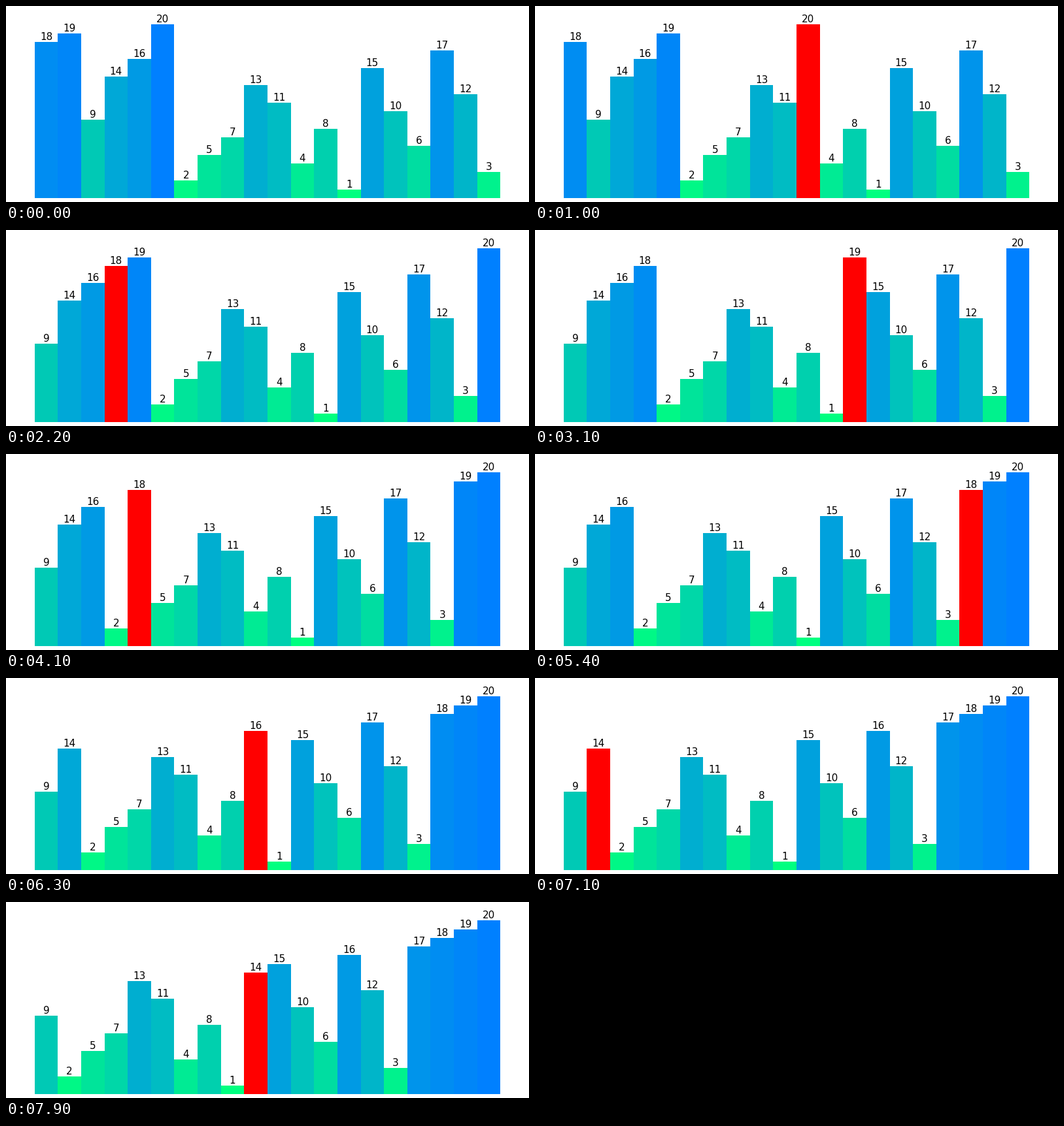
Write a matplotlib script that moves like this. It is 800x300 px and loops after 8 s.

```python
import matplotlib.pyplot as plt
from matplotlib.animation import FuncAnimation

START = [18, 19, 9, 14, 16, 20, 2, 5, 7, 13, 11, 4, 8, 1, 15, 10, 6, 17, 12, 3]
N = len(START)
FRAMES = 80
INTERVAL = 100


def color(value):
    """Green for the smallest value, blue for the largest."""
    t = (value - 1) / (N - 1)
    return 0, 1 - t / 2, 0.5 + t / 2


def bubble_sort(values):
    """Yield the list and the active position after every comparison."""
    values = list(values)
    yield list(values), None
    for end in range(N - 1, 0, -1):
        for j in range(end):
            if values[j] > values[j + 1]:
                values[j], values[j + 1] = values[j + 1], values[j]
            yield list(values), j + 1


steps = list(bubble_sort(START))[:FRAMES]

fig, ax = plt.subplots(figsize=(8, 3), dpi=100)
fig.subplots_adjust(left=0.01, right=0.99, bottom=0.02, top=0.95)
ax.axis("off")
ax.set_xlim(-1.5, N + 0.5)
ax.set_ylim(0, N + 1)

bars = ax.bar(range(N), START, width=1)
labels = [ax.text(i, v, str(v), ha="center", va="bottom", fontsize=11)
          for i, v in enumerate(START)]


def update(frame):
    values, active = steps[frame]
    for i, (bar, label, v) in enumerate(zip(bars, labels, values)):
        bar.set_height(v)
        bar.set_facecolor("red" if i == active else color(v))
        label.set_y(v)
        label.set_text(str(v))
    return [*bars, *labels]


anim = FuncAnimation(fig, update, frames=FRAMES, interval=INTERVAL,
                     repeat=True, repeat_delay=0)
plt.show()
```
